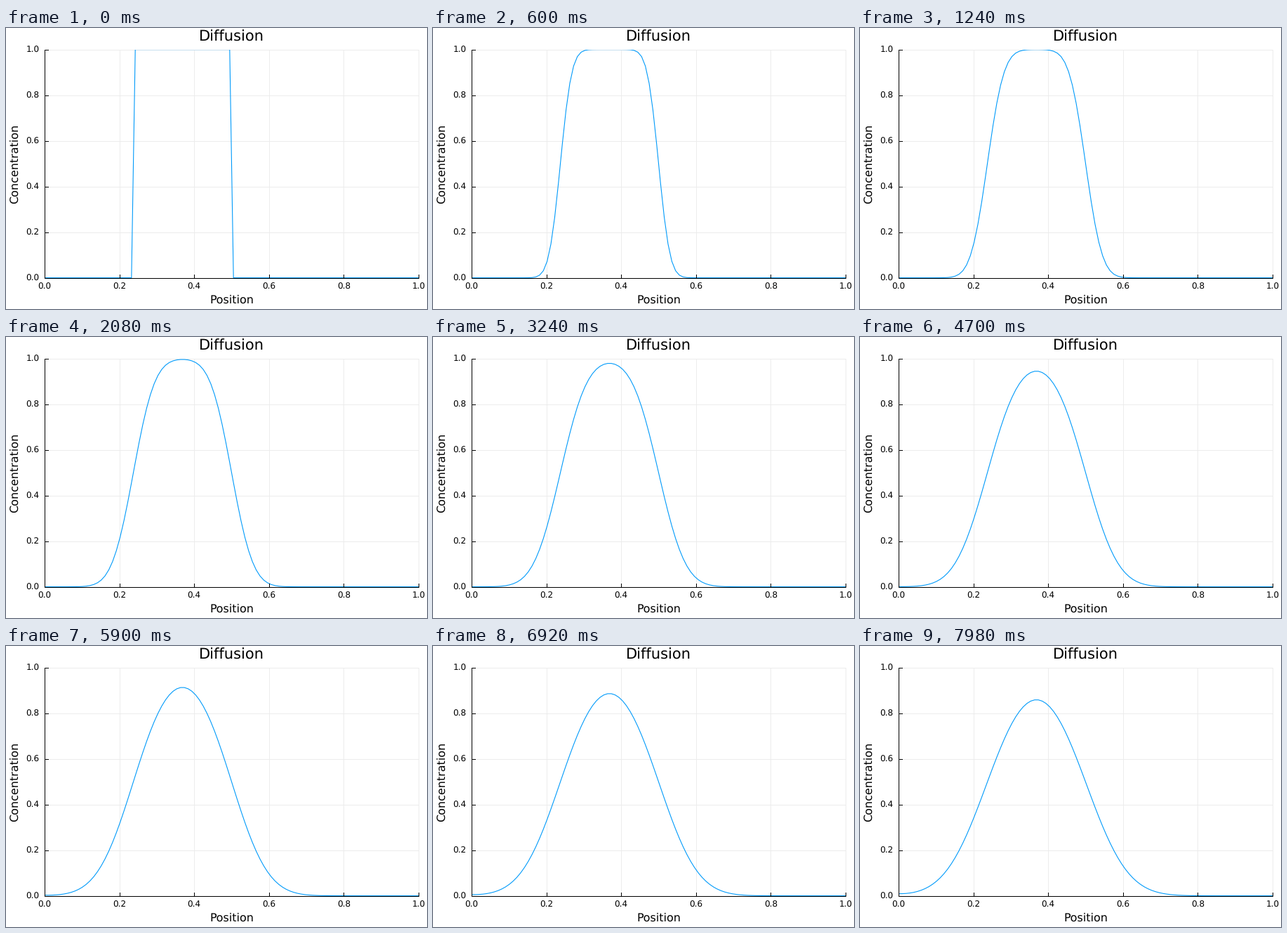
These frames come from a looping animation (600x400 px, 8000 ms). A matplotlib script:

```python
import matplotlib.pyplot as plt
import numpy as np
from matplotlib.animation import FuncAnimation
from matplotlib.patches import Rectangle

plt.rcParams["font.family"] = "DejaVu Sans"
plt.rcParams["text.hinting"] = "none"
plt.rcParams["text.hinting_factor"] = 1

W, H, DPI = 600, 400, 100
FRAMES, INTERVAL = 400, 20
LEFT, RIGHT, TOP, BOTTOM = 55.0, 588.0, 30.6, 355.6
PT = 72 / DPI  # points per pixel

# Explicit scheme for the diffusion equation with zero-flux ends
N = 100
DIFFUSIVITY, DT = 0.01, 0.001
x = np.linspace(0, 1, N)
RATE = DIFFUSIVITY * DT / (x[1] - x[0]) ** 2


def solve():
    c = np.zeros(N)
    c[24:50] = 1
    states = [c]
    for _ in range(FRAMES - 1):
        c = c.copy()
        c[1:-1] += RATE * (c[2:] - 2 * c[1:-1] + c[:-2])
        c[0], c[-1] = c[1], c[-2]
        states.append(c)
    return states


def px(v):
    return LEFT + v * (RIGHT - LEFT)


def py(v):
    return BOTTOM - v * (BOTTOM - TOP)


fig = plt.figure(figsize=(W / DPI, H / DPI), dpi=DPI, facecolor="white")
ax = fig.add_axes([0, 0, 1, 1])
ax.set(xlim=(0, W), ylim=(H, 0))
ax.axis("off")


def stroke(xs, ys, color="black", width=1.0, z=3, **kw):
    return ax.plot(xs, ys, color=color, lw=width * PT, zorder=z, **kw)[0]


def label(x0, y0, text, size, **kw):
    ax.text(x0, y0, text, fontsize=size * PT, color="black", **kw)


for v in np.arange(6) / 5:
    gx, gy = px(v), py(v)
    stroke([gx, gx], [TOP, BOTTOM], "#ececec", z=1)
    stroke([LEFT, RIGHT], [gy, gy], "#ececec", z=1)
    stroke([gx, gx], [BOTTOM, BOTTOM - 5])
    stroke([LEFT, LEFT + 5], [gy, gy])
    label(gx, 371.5, f"{v:.1f}", 11.85, ha="center", va="baseline")
    label(47.3, gy + 4.3, f"{v:.1f}", 11.85, ha="right", va="baseline")

stroke([LEFT, RIGHT], [BOTTOM, BOTTOM])
stroke([LEFT, LEFT], [TOP, BOTTOM])

label(321.5, 18.3, "Diffusion", 20.7, ha="center", va="baseline")
label(321.5, 392, "Position", 16.3, ha="center", va="baseline")
label(16.5, 193, "Concentration", 16.3, rotation=90,
      rotation_mode="anchor", ha="center", va="baseline")

states = solve()
curve = stroke(px(x), py(states[0]), "#009afa", 1.1, z=2)
curve.set_clip_path(Rectangle((LEFT, TOP), RIGHT - LEFT, BOTTOM - TOP,
                              transform=ax.transData))


def update(i):
    curve.set_ydata(py(states[i]))
    return (curve,)


anim = FuncAnimation(fig, update, frames=FRAMES, interval=INTERVAL,
                     repeat=True, repeat_delay=0)
plt.show()
```
